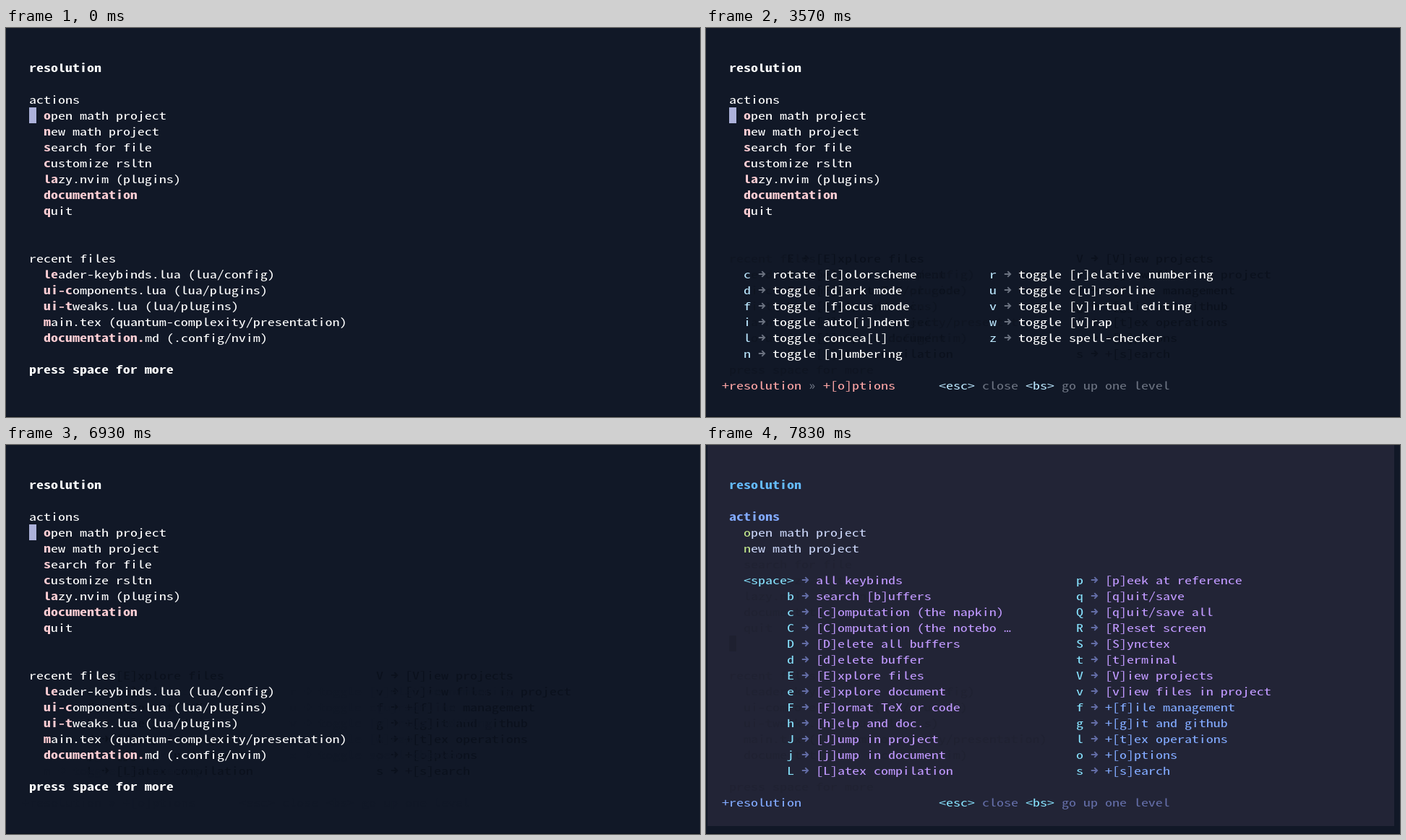
These frames come from a looping animation (960x539 px, 8000 ms). An HTML page:

```html
<!DOCTYPE html>
<html lang="en">
<head>
<meta charset="utf-8">
<title>Editor dashboard</title>
<style>
  html, body { margin: 0; width: 100%; height: 100%; overflow: hidden; background: #111827; }
  svg {
    display: block; width: 100vw; height: 100vh;
    --text: #fff; --title: #fff; --head: #fff; --hot: #fecdd3; --key: #bae6fd; --desc: #fff;
    --group: #fca5a5; --dim: #6b7280; --ghost: #0f1522; --trace: #0b111d; --bg: #111827;
  }
  svg.moon {
    --text: #c8d3f5; --title: #65bcff; --head: #82aaff; --hot: #c3e88d; --key: #86e1fc; --desc: #c099ff;
    --group: #82aaff; --dim: #636da6; --ghost: #202232; --bg: #222436;
  }
  text { white-space: pre; font-variant-ligatures: none; font-kerning: none; }
  text.alt { font: 16.667px "Noto Sans Mono", monospace; }
  path { fill: none; stroke: currentColor; stroke-width: 1.9; }
  g { fill: currentColor; }
  .text { color: var(--text); }
  .title { color: var(--title); font-weight: bold; }
  .head { color: var(--head); }
  .hot { color: var(--hot); font-weight: bold; }
  .foot { color: var(--title); font-weight: bold; }
  .moon .head { font-weight: bold; }
  .moon .hot { font-weight: normal; }
  .moon .foot { font-weight: normal; transform: skewX(-11deg); transform-origin: 0 479px; }
  .key { color: var(--key); }
  .desc { color: var(--desc); }
  .group { color: var(--group); }
  .dim { color: var(--dim); }
  .ghost { color: var(--ghost); }
  .trace { color: var(--trace); }
  .erase { color: var(--bg); }
</style>
</head>
<body>
<svg id="stage" viewBox="0 0 960 539"></svg>
<script>
const stage = document.getElementById('stage');
const LOOP = 8000, CELL = 10, LINE = 22, LEFT = 2, BASE = 17, X_HEIGHT = 8.1;
const FAMILY = '"Noto Sans Mono CJK JP", "Noto Sans Mono", "DejaVu Sans Mono", monospace';

// Choose the size at which a character fills one cell, and lower tall faces to the x-height.
const pen = document.createElement('canvas').getContext('2d');
pen.font = '1000px ' + FAMILY;
const metrics = pen.measureText('x');
const size = 1000 * CELL / metrics.width;
const squash = X_HEIGHT / (metrics.actualBoundingBoxAscent * size / 1000);
stage.style.fontFamily = FAMILY;
stage.style.fontSize = size + 'px';

const item = (row, col, str, kind) => ({ row, col, str, kind });

// Dashboard entries: the part before "|" is the hot key.
const entries = (row, lines) => lines.flatMap((line, i) => {
  const [hot, rest] = line.split('|');
  return [item(row + i, 5, hot, 'hot'), item(row + i, 5 + hot.length, rest, 'text')];
});

const dashboard = [
  item(2, 3, 'resolution', 'title'),
  item(4, 3, 'actions', 'head'),
  ...entries(5, ['o|pen math project', 'n|ew math project', 's|earch for file', 'c|ustomize rsltn',
    'la|zy.nvim (plugins)', 'documentation|', 'q|uit']),
  item(14, 3, 'recent files', 'head'),
  ...entries(15, ['le|ader-keybinds.lua (lua/config)', 'ui-c|omponents.lua (lua/plugins)',
    'ui-t|weaks.lua (lua/plugins)', 'm|ain.tex (quantum-complexity/presentation)',
    'documentation.|md (.config/nvim)']),
  item(21, 3, 'press space for more', 'foot')
];

// Key hints: "key label" lines, the key right-aligned so that it ends at column `end`.
const hints = (row, end, lines) => lines.flatMap((line, i) => {
  const cut = line.indexOf(' '), key = line.slice(0, cut), label = line.slice(cut + 1);
  const out = [
    item(row + i, end + 1 - key.length, key, 'key'),
    item(row + i, end + 2, '→', 'dim')
  ];
  const kind = label[0] === '+' ? 'group' : 'desc';
  const body = label.replace(' …', '');
  out.push(item(row + i, end + 4, body, kind));
  if (body !== label) out.push(item(row + i, end + 5 + body.length, '…', kind));
  return out;
});

const legend = [
  item(22, 2, '+resolution', 'group'),
  item(22, 32, '<esc>', 'key'), item(22, 38, 'close', 'dim'),
  item(22, 44, '<bs>', 'key'), item(22, 49, 'go up one level', 'dim')
];

const leader = [
  ...hints(8, 11, ['<space> all keybinds', 'b search [b]uffers', 'c [c]omputation (the napkin)',
    'C [C]omputation (the notebo …', 'D [D]elete all buffers', 'd [d]elete buffer', 'E [E]xplore files',
    'e [e]xplore document', 'F [F]ormat TeX or code', 'h [h]elp and doc.', 'J [J]ump in project',
    'j [j]ump in document', 'L [L]atex compilation']),
  ...hints(8, 51, ['p [p]eek at reference', 'q [q]uit/save', 'Q [q]uit/save all', 'R [R]eset screen',
    'S [S]ynctex', 't [t]erminal', 'V [V]iew projects', 'v [v]iew files in project',
    'f +[f]ile management', 'g +[g]it and github', 'l +[t]ex operations', 'o +[o]ptions', 's +[s]earch']),
  ...legend
];

const options = [
  ...hints(15, 5, ['c rotate [c]olorscheme', 'd toggle [d]ark mode', 'f toggle [f]ocus mode',
    'i toggle auto[i]ndent', 'l toggle concea[l]', 'n toggle [n]umbering']),
  ...hints(15, 39, ['r toggle [r]elative numbering', 'u toggle c[u]rsorline', 'v toggle [v]irtual editing',
    'w toggle [w]rap', 'z toggle spell-checker']),
  ...legend,
  item(22, 14, '»', 'dim'), item(22, 16, '+[o]ptions', 'group')
];

const escape = s => s.replace(/&/g, '&amp;').replace(/</g, '&lt;');

function glyphs({ row, col, str }) {
  const x = LEFT + col * CELL, y = row * LINE;
  if (str === '→') {
    return `<path d="M${x + 0.8} ${y + 11}h8.4M${x + 5.3} ${y + 7.2}l3.8 3.8l-3.8 3.8"/>`;
  }
  if (str === '…' || str === '»') {
    return `<text class="alt" x="${x}" y="${y + BASE}">${str}</text>`;
  }
  return `<text transform="translate(${x} ${y + BASE}) scale(1 ${squash})">${escape(str)}</text>`;
}

const paint = (items, kind) =>
  items.map(it => `<g class="${kind || it.kind}">${glyphs(it)}</g>`).join('');

const rows = (items, from, to) => items.filter(it => it.row >= from && it.row < to);

// Blank out every character that has a character of the popup above it.
function hideUnder(items, popup) {
  const taken = new Set();
  for (const it of popup) {
    [...it.str].forEach((c, i) => c !== ' ' && taken.add(it.row * 100 + it.col + i));
  }
  return items.map(it => ({
    ...it, str: [...it.str].map((c, i) => taken.has(it.row * 100 + it.col + i) ? ' ' : c).join('')
  }));
}

const cursor = (row, fill = '#acb1da') =>
  `<rect x="32" y="${row * LINE}" width="10" height="${LINE}" fill="${fill}"/>`;

const withPopup = (popup, top) =>
  paint(hideUnder(rows(dashboard, top, 24), popup), 'ghost') +
  paint(rows(dashboard, 0, top)) + paint(popup);

const panel = '<rect x="2" width="950" height="528" fill="#222436"/>';
const oldHints = () => paint(rows(leader, 14, 22), 'trace');

const scenes = [
  { at: 0, draw: () => cursor(5) + paint(dashboard) },
  { at: 500, draw: () => withPopup(leader, 7) },
  { at: 3570, draw: () => oldHints() + cursor(5) + withPopup(options, 14) },
  { at: 6900, draw: () => oldHints() + paint(options, 'erase') + cursor(5) + paint(dashboard) },
  { at: 6970, moon: true, draw: () => panel + cursor(12) + paint(dashboard) },
  { at: 7830, moon: true, draw: () => panel + cursor(12, '#1e2030') + withPopup(leader, 7) }
];

const edge = '<rect y="538" width="960" height="1" fill="#0c121d"/>';
let shown = null;

function render(t) {
  const scene = scenes.filter(s => s.at <= t).pop();
  if (scene === shown) return;
  shown = scene;
  stage.setAttribute('class', scene.moon ? 'moon' : '');
  stage.innerHTML = '<rect width="960" height="539" fill="#111827"/>' + edge + scene.draw();
}

const start = performance.now();
function tick() {
  render((performance.now() - start) % LOOP);
  requestAnimationFrame(tick);
}
tick();
</script>
</body>
</html>
```
